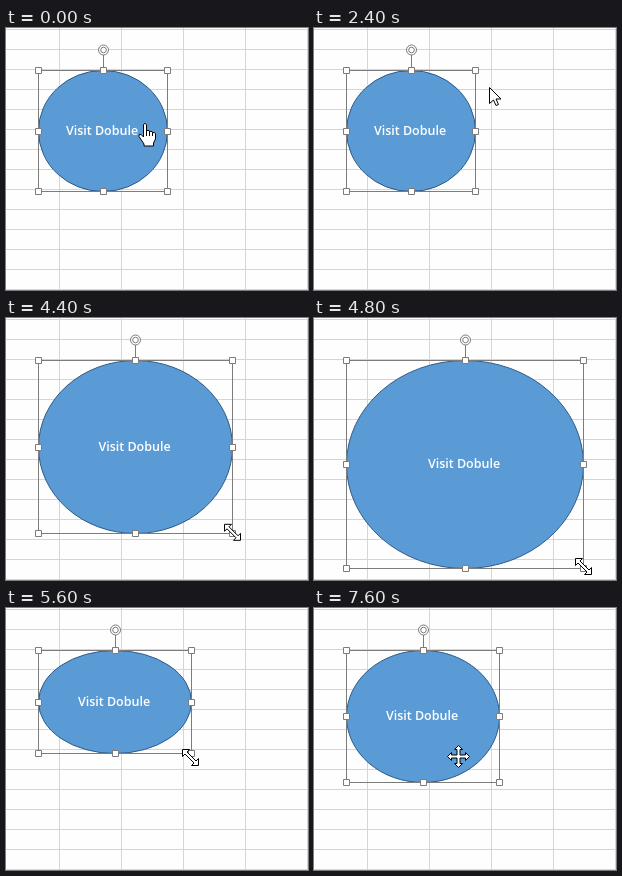
Write an HTML page that moves like this. It is 302 px wide and 262 px high and loops after 8000 ms.

```html
<!DOCTYPE html>
<html lang="en">
<head>
<meta charset="utf-8">
<title>Resizing a shape that holds a link</title>
<style>
html, body { margin: 0; width: 100%; height: 100%; overflow: hidden; background: #fefefe; }
svg { display: block; width: 302px; height: 262px; }
text { font: 11.5px "Open Sans", "Noto Sans", sans-serif; fill: #444; }
#label { font-size: 12.5px; font-weight: 600; fill: #fff; text-anchor: middle; }
.frame { fill: none; stroke: #7c7c7c; }
.knob { fill: #fff; stroke: #7c7c7c; }
.icon { fill: none; stroke: #5a5a5a; }
.blue { fill: #2e75b6; }
#cursor { fill: #fff; stroke: #000; stroke-linejoin: round; }
</style>
</head>
<body>
<svg viewBox="0 0 302 262">
  <path id="grid" fill="none" stroke="#d5d5d5"/>
  <ellipse id="oval" fill="#5b9bd5" stroke="#2f5a87"/>
  <text id="label">Visit Dobule</text>
  <path id="outline" class="frame"/>
  <path id="knobs" class="knob"/>
  <g id="turn">
    <circle r="5" class="knob"/>
    <circle r="2.8" class="frame"/>
  </g>
  <g id="menu">
    <rect x="136.5" y="94" width="180" height="180" fill="#000" opacity=".08"/>
    <rect x="138.5" y="95.5" width="180" height="180" fill="#fff" stroke="#c3c3c3"/>
    <path d="M168 177.500H302" stroke="#dcdcdc"/>
    <g class="icon">
      <path d="M147.500 102L155 112M157 102L149 112" stroke-width="1.5"/>
      <g stroke="#2e75b6" stroke-width="1.4"><circle cx="148" cy="114" r="2.300"/><circle cx="156.500" cy="114" r="2.300"/></g>
      <path d="M145.500 127.500H151L153.500 130V138.500H145.500Z"/>
      <path d="M150.500 132.500H156L158.500 135V143.500H150.500Z" fill="#fff"/>
      <path d="M152.500 137.500H157M152.500 140.500H157M147.500 131.500H150M147.500 134.500H150"/>
      <path d="M154 186.500H160M148.500 192V198M154 191.500H154.500V193"/>
      <path d="M152 262Q153 258 158 261"/>
    </g>
    <path class="blue" d="M146 185h6v5h-6zM153 190h4v4h-4z"/>
  </g>
  <path id="cursor"/>
</svg>
<script>
const $ = id => document.getElementById(id);
const set = (id, attrs) => {
  for (const k in attrs) $(id).setAttribute(k, attrs[k]);
};
const LOOP = 8000, STEP = 200, LEFT = 32, TOP = 42;

const cursors = {
  hand: 'M-1.500 1.500Q0-.8 1.500 1.500V8Q3 6.500 4.500 8V9Q6 7.500 7.500 9V10Q9 8.500 10.500 10.500V16L8.500 20V23H-1V21L-6 13.500Q-6.500 10.500-4 11.500L-1.500 14ZM1.500 8V13M4.500 9V13M7.500 10V13',
  arrow: 'M0 0V16L4 12.500L6.500 18L9 17L6.500 11.500H11.500Z',
  move: 'M0-11L4-7H1.500V-1.500H7V-4L11 0L7 4V1.500H1.500V7H4L0 11L-4 7H-1.500V1.500H-7V4L-11 0L-7-4V-1.500H-1.500V-7H-4Z',
  resize: 'M-8-8H-1L-3.500-5.500L5.500 3.500L8 1V8H1L3.500 5.500L-5.500-3.500L-8-1Z'
};

// time, cursor, cursor x and y, right and bottom of the shape
const keys = [
  [0, 'hand', 139, 95, 161, 163],
  [200, 'arrow', 139, 95, 161, 163],
  [400, 'arrow', 139, 95, 161, 163],
  [1200, 'arrow', 175.5, 59.5, 161, 163],
  [2600, 'arrow', 175.5, 59.5, 161, 163],
  [3400, 'move', 163, 146, 161, 163],
  [3600, 'move', 161.5, 156.5, 161, 163],
  [3800, 'resize', 162, 163, 161, 163],
  [4800, 'resize', 269.5, 248.5, 269, 250],
  [5000, 'resize', 269.5, 248.5, 269, 250],
  [5600, 'resize', 184.5, 149.5, 185, 145],
  [6200, 'resize', 186, 200, 185, 200],
  [6400, 'resize', 185.5, 184.5, 185, 185],
  [6600, 'resize', 186, 174, 185, 174],
  [6800, 'resize', 186, 174, 185, 174],
  [7000, 'move', 178, 168, 185, 174],
  [7600, 'move', 144.5, 148.5, 185, 174],
  [LOOP, 'move', 144.5, 148.5, 185, 174]
];

let grid = '';
for (let y = 1.5; y < 262; y += 20) grid += `M0 ${y}H302`;
for (let x = 53.5; x < 302; x += 62) grid += `M${x} 0V262`;
set('grid', { d: grid });

const items = { Cut: 114, Copy: 140, Paste: 166, Group: 195, 'Format Shape...': 221, 'Open Hyperlink': 247 };
for (const name in items) {
  const line = document.createElementNS('http://www.w3.org/2000/svg', 'text');
  line.textContent = name;
  line.setAttribute('x', 172);
  line.setAttribute('y', items[name]);
  $('menu').append(line);
}

function drawShape(right, bottom) {
  const l = LEFT + .5, t = TOP + .5, r = Math.round(right) + .5, b = Math.round(bottom) + .5;
  const cx = (l + r) / 2, cy = (t + b) / 2;
  const mx = Math.floor(cx) + .5, my = Math.floor(cy) + .5;
  set('oval', { cx, cy, rx: (r - l) / 2, ry: (b - t) / 2 });
  set('label', { x: cx - 1, y: cy + 3.5 });
  set('outline', { d: `M${l} ${t}H${r}V${b}H${l}ZM${mx} 27V${t}` });
  let d = '';
  for (const x of [l, mx, r])
    for (const y of [t, my, b])
      if (x !== mx || y !== my) d += `M${x - 3} ${y - 3}h6v6h-6z`;
  set('knobs', { d });
  set('turn', { transform: `translate(${mx} 22)` });
}

function draw(now) {
  const t = Math.floor(now % LOOP / STEP) * STEP;
  const i = keys.findIndex(k => k[0] > t) - 1;
  const a = keys[i], b = keys[i + 1];
  const p = (t - a[0]) / (b[0] - a[0]);
  const [x, y, right, bottom] = [2, 3, 4, 5].map(n => a[n] + (b[n] - a[n]) * p);
  drawShape(right, bottom);
  set('menu', { visibility: t >= 200 && t < 2000 ? 'visible' : 'hidden' });
  set('cursor', { d: cursors[a[1]], transform: `translate(${x} ${y})` });
}

const start = performance.now();
function tick() {
  draw(performance.now() - start);
  requestAnimationFrame(tick);
}
tick();
</script>
</body>
</html>
```
